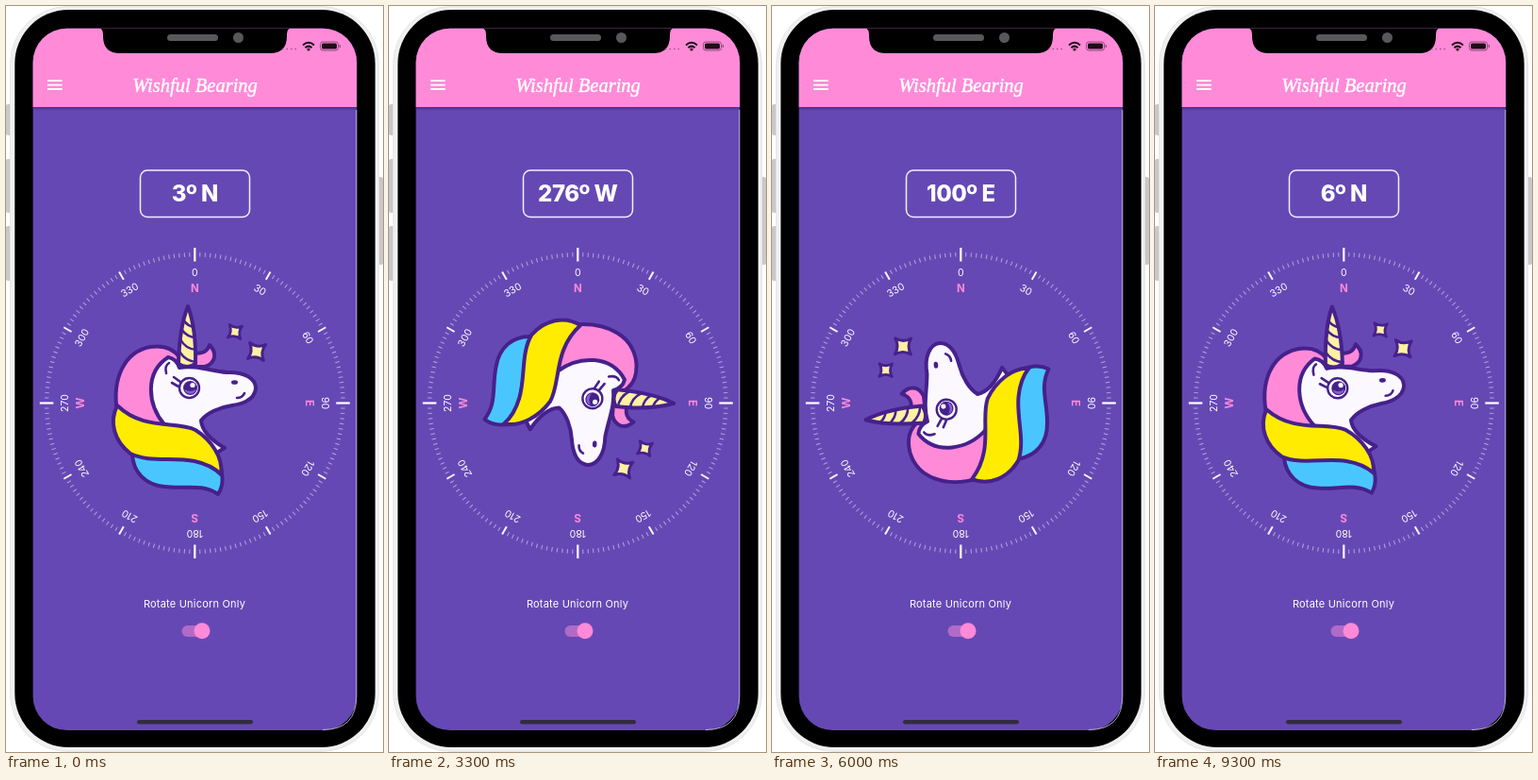
An HTML page for the animation above (9400 ms loop, 400 by 790 pixels).

```html
<!DOCTYPE html>
<html lang="en">
<head>
<meta charset="utf-8">
<title>Wishful Bearing</title>
<style>
html, body { margin: 0; width: 100%; height: 100%; overflow: hidden; background: #fff; }
svg { display: block; width: 400px; height: 790px; }
text { font-family: Inter, sans-serif; text-anchor: middle; fill: #fff; }
.title { font: italic 20.5px "Liberation Serif", serif; stroke: #fff; stroke-width: .45px; }
.heading { font-weight: 800; font-size: 24px; letter-spacing: -.5px; }
.degree { font-size: 10.5px; }
.cardinal { font-size: 11.5px; font-weight: 700; fill: #ff8ad8; }
.label { font-size: 11px; letter-spacing: .2px; }
.ink { stroke: #46218b; stroke-width: 4; stroke-linejoin: round; stroke-linecap: round; }
.line { fill: none; stroke-width: 2.6; }
</style>
</head>
<body>
<svg viewBox="0 0 400 790">
  <defs>
    <linearGradient id="shade" x1="0" y1="0" x2="0" y2="1">
      <stop offset="0" stop-color="#2a1660" stop-opacity=".5"/>
      <stop offset="1" stop-color="#2a1660" stop-opacity="0"/>
    </linearGradient>
    <clipPath id="screen"><rect x="28.600" y="23.700" width="343.600" height="743.300" rx="36"/></clipPath>
    <path id="horn" d="M183 379Q184 340 193 318Q202 342 201 379Q192 385 183 379Z"/>
    <clipPath id="hornClip"><use href="#horn"/></clipPath>
    <path id="star" d="M0-12Q2.5-2.5 12 0Q2.5 2.5 0 12Q-2.5 2.5-12 0Q-2.5-2.5 0-12Z"/>
  </defs>

  <g fill="#c9c9cb">
    <rect x="0" y="104" width="6" height="33" rx="2"/>
    <rect x="0" y="162" width="6" height="57" rx="2"/>
    <rect x="0" y="233" width="6" height="58" rx="2"/>
    <rect x="394" y="181" width="6" height="93" rx="2"/>
  </g>
  <rect x="4.500" y="0.500" width="391" height="789" rx="61" fill="#f0f0f0" stroke="#e6e6e7"/>
  <rect x="9.300" y="4" width="382.400" height="781" rx="57"/>

  <g clip-path="url(#screen)">
    <rect x="28" y="23" width="345" height="745" fill="#6648b5"/>
    <rect x="28" y="107" width="345" height="4" fill="url(#shade)"/>
    <rect x="28" y="23" width="345" height="84" fill="#ff8ad8"/>
    <path d="M98 23Q103 24 103 30V32Q103 50 121 50H280Q298 50 298 32V30Q298 24 303 23Z"/>
  </g>
  <path d="M371.800 110V731Q371.800 766.500 336 766.500" fill="none" stroke="#d9d0f0" stroke-width=".8"/>
  <rect x="171" y="30" width="54" height="7" rx="3.500" fill="#58585b"/>
  <circle cx="246.500" cy="33.500" r="5.500" fill="#58585b"/>

  <path d="M293 45.500H310" stroke="#a4558c" stroke-width="1.500" stroke-dasharray="1.500 3"/>
  <g fill="none" stroke="#1d0d18" stroke-width="2">
    <path d="M315 41.500Q321 36 327 41.500M317.500 44.200Q321 41 324.500 44.200"/>
    <circle cx="321" cy="46" r=".6"/>
  </g>
  <rect x="333.500" y="38" width="19" height="9" rx="2.500" fill="none" stroke="#8d4a78"/>
  <rect x="335" y="39.500" width="16" height="6" rx="1.500" fill="#1d0d18"/>
  <path d="M354.300 41V44" stroke="#8d4a78" stroke-width="1.300"/>

  <path d="M44 79.200H59.700M44 83.600H59.700M44 88H59.700" stroke="#fff" stroke-width="1.800"/>
  <text class="title" x="200.500" y="91">Wishful Bearing</text>
  <rect x="142.500" y="174" width="116" height="49.500" rx="7.500" fill="none" stroke="#f3effb" stroke-width="1.500"/>
  <text class="heading" id="heading" x="200.300" y="206.500"></text>

  <g id="dial" transform="translate(200.300 420.500)"></g>

  <g id="unicorn">
    <path class="ink" fill="#ff8ad8" d="M118 430C112 394 126 366 153 361C166 359 177 362 184 372L170 444C148 448 130 442 118 430Z"/>
    <path class="ink" fill="#fbf8ff" d="M222 474C206 462 186 446 168 443C150 422 147 388 172 372C178 373 182 377 184 383C200 380 216 386 234 388C252 387 265 394 265 405C264 416 253 421 240 423C226 425 213 431 207 439C208 451 220 461 232 468Z"/>
    <path class="ink" fill="#4ac6ff" d="M134 475C135 494 148 507 168 509C190 512 207 505 225 517C231 508 230 499 228 488C204 478 166 480 134 475Z"/>
    <path class="ink" fill="#ffec00" d="M118 423C109 441 115 461 132 474C152 484 178 477 200 482C214 485 222 490 228 496C231 478 217 459 201 449C180 439 146 450 118 423Z"/>
    <path class="ink" fill="#ff8ad8" d="M199 367C206 369 213 367 216 359C224 367 223 378 211 382L199 382Z"/>
    <use class="ink" href="#horn" fill="#fff0a4"/>
    <g clip-path="url(#hornClip)">
      <path class="ink line" d="M184 366Q191 377 203 377M185 353Q191 364 203 364M186 342Q192 351 202 351M188 332Q193 340 201 340"/>
    </g>
    <path class="ink line" d="M170 389Q168 381 173 378M183 403L176 399M185 398L178 393M245 415Q251 415 253 410"/>
    <circle class="ink" cx="194.500" cy="404.500" r="10.500" fill="#fff" style="stroke-width:2.4px"/>
    <circle cx="195.500" cy="404.500" r="7.500" fill="#46218b"/>
    <path d="M189.500 406A6.200 6.200 0 0 0 201.500 406Q195.500 410 189.500 406Z" fill="#8a60d6"/>
    <circle cx="198" cy="401.500" r="2.600" fill="#fff"/>
    <ellipse cx="242.500" cy="398.500" rx="3.500" ry="2.300" fill="#46218b"/>
    <g class="ink" fill="#fff0a4">
      <use href="#star" transform="translate(266 366) rotate(-38)" stroke-width="3"/>
      <use href="#star" transform="translate(243 345) rotate(-38) scale(.8)" stroke-width="3.500"/>
    </g>
  </g>

  <text class="label" x="200" y="637">Rotate Unicorn Only</text>
  <rect x="186.500" y="656" width="28" height="12" rx="6" fill="#b26ac7"/>
  <circle cx="208" cy="661.700" r="8.500" fill="#ff8ad8"/>
  <rect x="139" y="756" width="123" height="4.500" rx="2.250" fill="#332c40"/>
</svg>
<script>
const LOOP = 9400, STEP = 100;
const NAMES = ["N", "NE", "E", "SE", "S", "SW", "W", "NW"];
const LIMITS = [22.5, 67.5, 112.5, 157.5, 202.5, 247.5, 305, 337.5];

// [ms, degrees]; the unicorn trails slightly behind the reading
const TURN = [[0, 0], [1000, 38.6], [2400, 115], [2700, 120], [4100, 28], [5200, -59],
  [6500, -106], [6900, -104], [8900, -4], [9300, -2.9]];
const READING = [[0, -3], [1000, 57], [2400, 119], [2600, 120.4], [4100, 13], [5200, -63],
  [6400, -107], [6900, -102], [9000, -6], [9300, -6]];

const byId = id => document.getElementById(id);
const dial = byId("dial"), unicorn = byId("unicorn"), heading = byId("heading");

function add(tag, attrs, text) {
  const el = document.createElementNS("http://www.w3.org/2000/svg", tag);
  for (const key in attrs) el.setAttribute(key, attrs[key]);
  if (text !== undefined) el.textContent = text;
  dial.append(el);
}

function buildDial() {
  for (let a = 0; a < 360; a += 2) {
    const major = a % 30 === 0, main = a % 90 === 0;
    const [inner, outer, width, alpha] = main ? [150, 164.5, 2.2, 1]
      : major ? [151, 160.5, 2, .95] : [155, 159.5, 1, .5];
    const transform = `rotate(${a})`;
    add("path", { d: `M0 ${-inner}V${-outer}`, stroke: "#fff", "stroke-width": width, opacity: alpha, transform });
    if (major) add("text", { class: "degree", y: -134.7, transform }, a);
    if (main) add("text", { class: "cardinal", y: -117.3, transform }, NAMES[a / 45]);
  }
}

function slope(keys, i) {
  if (i === 0 || i === keys.length - 1) return 0;
  const rate = j => (keys[j + 1][1] - keys[j][1]) / (keys[j + 1][0] - keys[j][0]);
  const a = rate(i - 1), b = rate(i);
  return a * b > 0 ? 2 * a * b / (a + b) : 0;
}

// smooth curve through the keys without overshoot
function curve(keys, t) {
  let i = 0;
  while (i < keys.length - 2 && t > keys[i + 1][0]) i++;
  const [t0, v0] = keys[i], [t1, v1] = keys[i + 1];
  const span = t1 - t0, u = Math.min(1, (t - t0) / span), w = 1 - u;
  return v0 * (1 + 2 * u) * w * w + v1 * u * u * (3 - 2 * u)
    + span * u * w * (slope(keys, i) * w - slope(keys, i + 1) * u);
}

function draw(ms) {
  const t = Math.floor((ms % LOOP) / STEP) * STEP;
  unicorn.setAttribute("transform", `rotate(${curve(TURN, t).toFixed(2)} 200 420)`);
  const deg = (360 - Math.round(curve(READING, t))) % 360;
  const sector = LIMITS.findIndex(limit => deg < limit);
  heading.textContent = `${deg}º ${NAMES[Math.max(0, sector)]}`;
}

buildDial();
draw(0);
const start = performance.now();
function tick(now) {
  draw(Math.max(0, now - start));
  requestAnimationFrame(tick);
}
requestAnimationFrame(tick);
</script>
</body>
</html>
```
